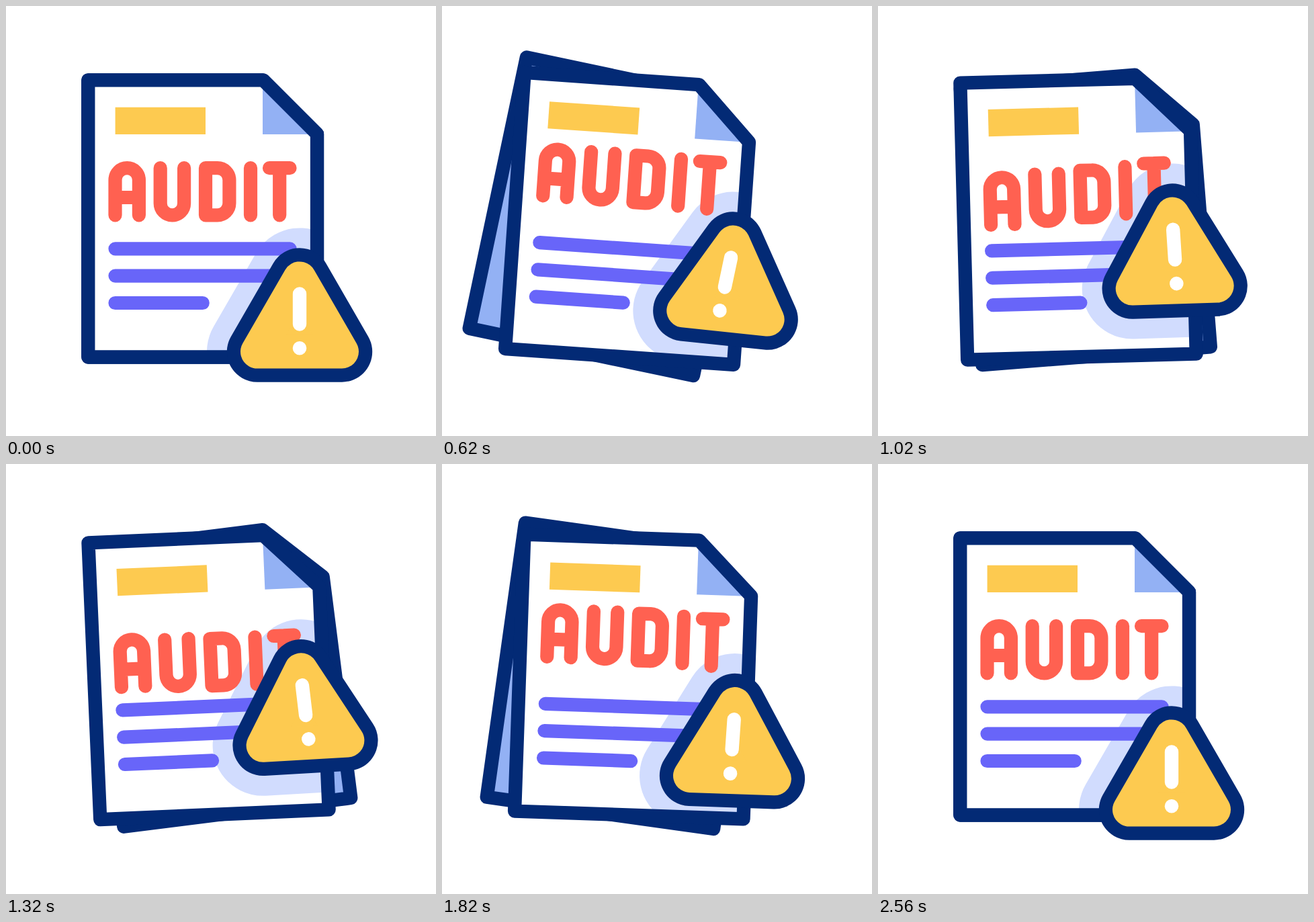
Recreate the animation shown at these times as an HTML page. Size 640 px wide and 640 px high, loop 2620 ms.

```html
<!DOCTYPE html>
<html lang="en">
<head>
<meta charset="utf-8">
<title>Audit warning</title>
<style>
  html, body { margin: 0; width: 100%; height: 100%; overflow: hidden; background: #fff; }
  svg { display: block; width: 100%; height: 100%; stroke-linecap: round; stroke-linejoin: round; }
  .navy { stroke: #032a75; }
  .outline { stroke-width: 20.3; }
  .letters { fill: none; stroke: #ff6151; stroke-width: 20.2; }
  .lines { stroke: #6865f9; stroke-width: 20.2; }
</style>
</head>
<body>
<svg viewBox="0 0 640 640">
  <defs>
    <path id="sheet" d="M122.3 110.3H382.7L463 190.5V522.5H122.3Z"/>
    <path id="triangle" d="M374 514.5H500L437 405.4Z"/>
    <clipPath id="inside"><use href="#sheet"/></clipPath>
  </defs>

  <use id="back" href="#sheet" class="navy outline" fill="#93b1f4"/>

  <g id="front">
    <use href="#sheet" fill="#fff"/>
    <g clip-path="url(#inside)">
      <g id="unturn">
        <use class="sign" href="#triangle" fill="#d1dcfe" stroke="#d1dcfe" stroke-width="150"/>
      </g>
    </g>
    <path d="M382 110V191H463Z" fill="#93b1f4"/>
    <path d="M162.6 150.8H297V191H162.6Z" fill="#fdca50"/>
    <path class="lines" d="M162.5 361.3H422.5M162.5 401.6H422.5M162.5 442H292.7"/>
    <use href="#sheet" class="navy outline" fill="none"/>
    <g class="letters">
      <path d="M162.5 311.3V258.8a17.7 17.7 0 0 1 35.4 0V311.3M162.5 285H197.9"/>
      <path d="M229.7 241.2V293.7a17.7 17.7 0 0 0 35.4 0V241.2"/>
      <path d="M297 241.2H314.7a17.7 17.7 0 0 1 17.7 17.7V293.6a17.7 17.7 0 0 1 -17.7 17.7H297Z"/>
      <path d="M364 241.2V311.3"/>
      <path d="M392 241.2H422.5M407.2 241.2V311.3"/>
    </g>
  </g>

  <g class="sign">
    <use href="#triangle" class="navy" stroke-width="90.4"/>
    <use href="#triangle" fill="#fdca50" stroke="#fdca50" stroke-width="50"/>
    <g id="mark" fill="#fff">
      <path d="M437 428.5V473.6" stroke="#fff" stroke-width="20.4"/>
      <circle cx="437" cy="509.2" r="10.3"/>
    </g>
  </g>
</svg>
<script>
  const LOOP = 2620;
  const find = selector => [...document.querySelectorAll(selector)];
  const [back, front, unturn, mark] = find('#back, #front, #unturn, #mark');
  const signs = find('.sign');
  const letters = find('.letters path');

  // Eases through evenly spaced key values.
  function keyed(time, step, values) {
    const position = Math.min(Math.max(time / step, 0), values.length - 1);
    const index = Math.min(Math.floor(position), values.length - 2);
    const s = position - index;
    return values[index] + (values[index + 1] - values[index]) * s * s * (3 - 2 * s);
  }

  const move = (element, transform) => element.setAttribute('transform', transform);
  const turnSheet = angle => `rotate(${angle} 286 110.3)`;

  function draw(now) {
    const t = now % LOOP;
    const frontAngle = keyed(t, 600, [0, 4, -3, 2, 0]);
    const signAngle = keyed(t, 600, [0, 6, -4, 2, 0]);
    const lift = keyed(t, 1200, [0, -102, 0]);

    move(back, turnSheet(keyed(t, 600, [0, 12, -9, 8, 0])));
    move(front, turnSheet(frontAngle));
    move(unturn, turnSheet(-frontAngle));
    signs.forEach(sign => move(sign, `translate(0 ${lift}) rotate(${signAngle} 437 370)`));
    move(mark, `rotate(${signAngle} 437 421)`);
    letters.forEach((letter, i) =>
      move(letter, `translate(0 ${keyed(t - i * 40, 600, [0, -20, 20, -20, 0])})`));
  }

  function tick() {
    draw(performance.now());
    requestAnimationFrame(tick);
  }
  tick();
</script>
</body>
</html>
```
